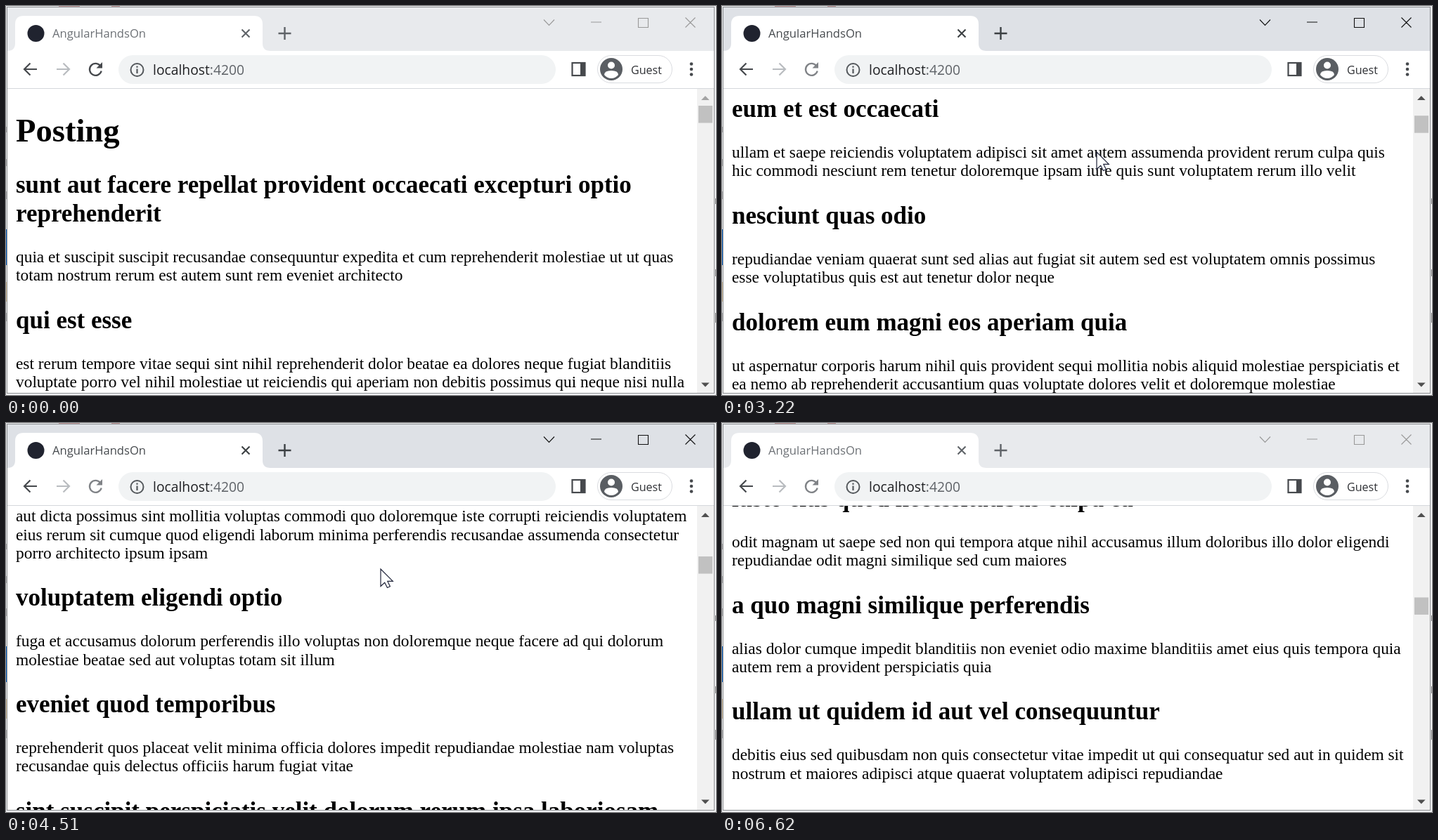
These frames come from a looping animation (1010x554 px, 6730 ms). An HTML page:

```html
<!DOCTYPE html>
<html lang="en">
<head>
<meta charset="utf-8">
<title>Posting</title>
<style>
html, body { margin: 0; width: 100%; height: 100%; overflow: hidden; background: #f4f5f7; }
svg { position: absolute; left: 0; top: 0; }
svg text { font-family: "Open Sans", "Noto Sans", sans-serif; }
#view { position: absolute; left: 2px; top: 118px; width: 981px; height: 433px; overflow: hidden; background: #fff; }
#doc { display: flow-root; margin-left: 12px; width: 957.5px; color: #000; font: 23.38px/26.3px "Liberation Serif", "Times New Roman", serif; }
h1 { font-size: 46.6px; line-height: 53.6px; margin: 32.5px 0 31.1px; }
h2 { font-size: 35px; line-height: 40.9px; margin: 31.1px 0 27.1px; }
p { margin: 0; }
</style>
</head>
<body>
<svg id="frame" width="1010" height="554" viewBox="0 0 1010 554" fill="none">
  <rect width="1010" height="554" fill="#f1f2f4"/>
  <path d="M0 318h2v51h-2z" fill="#0b63c4"/>
  <path d="M0 393h2v28h-2z" fill="#d8c3a0"/>
  <path d="M0 172v8M0 218v10M0 264v11M0 437v12M1009.500 274v8M1009.500 375v10M1009.500 437v14" stroke="#777"/>
  <path d="M75 .5h30M150 .5h12" stroke="#c9a0a0"/>
  <rect x="1.500" y="1.500" width="1006" height="550" fill="#fff" stroke="#8a8c8f"/>
  <rect id="strip" x="2" y="2" width="1005" height="62"/>
  <path d="M2 64Q13 64 13 53V26Q13 14 25 14H353Q365 14 365 26V53Q365 64 376 64Z" fill="#fff"/>
  <circle id="icon" cx="42.500" cy="39" r="12" fill="#20232f"/>
  <path id="spin" stroke="#c4c8cd" stroke-width="2"/>
  <text id="tab" x="66" y="45" font-size="16.600">AngularHandsOn</text>
  <g id="marks" stroke-width="2.100">
    <path d="M335.500 33.500l11 11m0-11l-11 11"/>
    <path d="M387.500 39h18m-9-9v18" stroke-width="2.400"/>
  </g>
  <path id="controls" d="M765 19.500l7.500 8 7.500-8M832 23h15M899.500 17.500h14v13h-14zM966.500 16.500l14 14m0-14l-14 14" stroke-width="1.100"/>
  <path d="M44 90H26m8.500-8.500L26 90l8.500 8.500" stroke="#46494d" stroke-width="2.200"/>
  <path d="M72 90h18m-8.500-8.500L90 90l-8.500 8.500" stroke="#b9bcc0" stroke-width="2.200"/>
  <g id="reload">
    <path d="M134.500 85.500A8.500 8.500 0 1 0 135.700 92.500" stroke-width="2.300"/>
    <path d="M137 80v8.500h-8.500z" stroke="none"/>
  </g>
  <path id="stop" d="M119.500 82.500l15.500 15.500m0-15.500l-15.500 15.500" stroke="#46494d" stroke-width="2.300"/>
  <rect x="160" y="70" width="622" height="41" rx="20.500" fill="#f1f3f4"/>
  <circle cx="186.500" cy="91" r="9" stroke="#54585c" stroke-width="2"/>
  <path d="M186.500 89.500v6.500M186.500 85.500v2.300" stroke="#54585c" stroke-width="2.200"/>
  <text x="209" y="98" font-size="19.300" fill="#202124">localhost<tspan fill="#5f6368">:4200</tspan></text>
  <g id="share" stroke="#5f6368" stroke-width="2.200">
    <path d="M746 87v-3q0-3 3-3h3M760 81h3q3 0 3 3v3M766 95v3q0 3-3 3h-3M752 101h-3q-3 0-3-3v-3"/>
    <path d="M751.500 86.500h3v3h-3zM757.500 86.500h3v3h-3zM751.500 92.500h3v3h-3zM757.500 92.500h3v3h-3z"/>
  </g>
  <rect x="805.500" y="81" width="18" height="18" stroke="#46494d" stroke-width="2.200"/>
  <path d="M817 81h7v18h-7z" fill="#46494d"/>
  <rect x="841.500" y="70.500" width="106" height="39" rx="19.500" fill="#fff" stroke="#dadce0"/>
  <circle cx="861" cy="90" r="16" fill="#5a5e63"/>
  <circle cx="861" cy="84.500" r="5" fill="#fff"/>
  <path d="M851 98q0-6 10-6t10 6q-4 5-10 5t-10-5z" fill="#fff"/>
  <text x="889" y="96.500" font-size="16.100" fill="#303236">Guest</text>
  <g fill="#46494d"><circle cx="975" cy="82.500" r="2.300"/><circle cx="975" cy="90" r="2.300"/><circle cx="975" cy="97.500" r="2.300"/></g>
  <path d="M2 117.500h1005" stroke="#d5d8dc"/>
  <g id="bar">
    <rect x="983" y="118" width="24" height="433" fill="#f1f1f1"/>
    <path id="up" d="M989 134l5.800-6 5.800 6z"/>
    <path d="M989 536.500l5.800 6 5.800-6z" fill="#505050"/>
    <rect id="thumb" x="985" width="20" height="24.500" fill="#c1c1c1"/>
  </g>
</svg>
<div id="view"><div id="doc"><h1>Posting</h1><div id="list"></div></div></div>
<svg width="1010" height="554" viewBox="0 0 1010 554">
  <path id="arrow" d="M0 0V24.500l5.700-5.300 3.700 7.300 4-1.800-3.600-7.300H17.300z" fill="#fff" stroke="#20243a" stroke-width="1.200"/>
  <path id="beam" d="M-6-11h4.500L0-9.500 1.500-11H6M0-10V10M-6 11h4.500L0 9.500 1.500 11H6" fill="none" stroke="#111" stroke-width="2"/>
</svg>
<script>
const posts = `sunt aut facere repellat provident occaecati excepturi optio reprehenderit|quia et suscipit suscipit recusandae consequuntur expedita et cum reprehenderit molestiae ut ut quas totam nostrum rerum est autem sunt rem eveniet architecto
qui est esse|est rerum tempore vitae sequi sint nihil reprehenderit dolor beatae ea dolores neque fugiat blanditiis voluptate porro vel nihil molestiae ut reiciendis qui aperiam non debitis possimus qui neque nisi nulla
ea molestias quasi exercitationem repellat qui ipsa sit aut|et iusto sed quo iure voluptatem occaecati omnis eligendi aut ad voluptatem doloribus vel accusantium quis pariatur molestiae porro eius odio et labore et velit aut
eum et est occaecati|ullam et saepe reiciendis voluptatem adipisci sit amet autem assumenda provident rerum culpa quis hic commodi nesciunt rem tenetur doloremque ipsam iure quis sunt voluptatem rerum illo velit
nesciunt quas odio|repudiandae veniam quaerat sunt sed alias aut fugiat sit autem sed est voluptatem omnis possimus esse voluptatibus quis est aut tenetur dolor neque
dolorem eum magni eos aperiam quia|ut aspernatur corporis harum nihil quis provident sequi mollitia nobis aliquid molestiae perspiciatis et ea nemo ab reprehenderit accusantium quas voluptate dolores velit et doloremque molestiae
magnam facilis autem|dolore placeat quibusdam ea quo vitae magni quis enim qui quis quo nemo aut saepe quidem repellat excepturi ut quia sunt ut sequi eos ea sed quas
dolorem dolore est ipsam|dignissimos aperiam dolorem qui eum facilis quibusdam animi sint suscipit qui sint possimus cum quaerat magni maiores excepturi ipsam ut commodi dolor voluptatum modi aut vitae
nesciunt iure omnis dolorem tempora et accusantium|consectetur animi nesciunt iure dolore enim quia ad veniam autem ut quam aut nobis et est aut quod aut provident voluptas autem voluptas
optio molestias id quia eum|quo et expedita modi cum officia vel magni doloribus qui repudiandae vero nisi sit quos veniam quod sed accusamus veritatis error
et ea vero quia laudantium autem|delectus reiciendis molestiae occaecati non minima eveniet qui voluptatibus accusamus in eum beatae sit vel qui neque voluptates ut commodi qui incidunt ut animi commodi
in quibusdam tempore odit est dolorem|itaque id aut magnam praesentium quia et ea odit et ea voluptas et sapiente quia nihil amet occaecati quia id voluptatem incidunt ea est distinctio odio
dolorum ut in voluptas mollitia et saepe quo animi|aut dicta possimus sint mollitia voluptas commodi quo doloremque iste corrupti reiciendis voluptatem eius rerum sit cumque quod eligendi laborum minima perferendis recusandae assumenda consectetur porro architecto ipsum ipsam
voluptatem eligendi optio|fuga et accusamus dolorum perferendis illo voluptas non doloremque neque facere ad qui dolorum molestiae beatae sed aut voluptas totam sit illum
eveniet quod temporibus|reprehenderit quos placeat velit minima officia dolores impedit repudiandae molestiae nam voluptas recusandae quis delectus officiis harum fugiat vitae
sint suscipit perspiciatis velit dolorum rerum ipsa laboriosam odio|suscipit nam nisi quo aperiam aut asperiores eos fugit maiores voluptatibus quia voluptatem quis ullam qui in alias quia est consequatur magni mollitia accusamus ea nisi voluptate dicta
fugit voluptas sed molestias voluptatem provident|eos voluptas et aut odit natus earum aspernatur fuga molestiae ullam deserunt ratione qui eos qui nihil ratione nemo velit ut aut id quo
voluptate et itaque vero tempora molestiae|eveniet quo quis laborum totam consequatur non dolor ut et est repudiandae est voluptatem vel debitis et magnam
adipisci placeat illum aut reiciendis qui|illum quis cupiditate provident sit magnam ea sed aut omnis veniam maiores ullam consequatur atque adipisci quo iste expedita sit quos voluptas
doloribus ad provident suscipit at|qui consequuntur ducimus possimus quisquam amet similique suscipit porro ipsam amet eos veritatis officiis exercitationem vel fugit aut necessitatibus totam omnis rerum consequatur expedita quidem cumque explicabo
asperiores ea ipsam voluptatibus modi minima quia sint|repellat aliquid praesentium dolorem quo sed totam minus non itaque nihil labore molestiae sunt dolor eveniet hic recusandae veniam tempora et tenetur expedita sunt
dolor sint quo a velit explicabo quia nam|eos qui et ipsum ipsam suscipit aut sed omnis non odio expedita earum mollitia molestiae aut atque rem suscipit nam impedit esse
maxime id vitae nihil numquam|veritatis unde neque eligendi quae quod architecto quo neque vitae est illo sit tempora doloremque fugit quod et et vel beatae sequi ullam sed tenetur perspiciatis
autem hic labore sunt dolores incidunt|enim et ex nulla omnis voluptas quia qui voluptatem consequatur numquam aliquam sunt totam recusandae id dignissimos aut sed asperiores deserunt
rem alias distinctio quo quis|ullam consequatur ut omnis quis sit vel consequuntur ipsa eligendi ipsum molestiae et omnis error nostrum molestiae illo tempore quia et distinctio
est et quae odit qui non|similique esse doloribus nihil accusamus omnis dolorem fuga consequuntur reprehenderit fugit recusandae temporibus perspiciatis cum ut laudantium omnis aut molestiae vel vero
quasi id et eos tenetur aut quo autem|eum sed dolores ipsam sint possimus debitis occaecati debitis qui qui et ut placeat enim earum aut odit facilis consequatur suscipit necessitatibus rerum sed inventore temporibus consequatur
delectus ullam et corporis nulla voluptas sequi|non et quaerat ex quae ad maiores maiores recusandae totam aut blanditiis mollitia quas illo ut voluptatibus voluptatem similique nostrum eum
iusto eius quod necessitatibus culpa ea|odit magnam ut saepe sed non qui tempora atque nihil accusamus illum doloribus illo dolor eligendi repudiandae odit magni similique sed cum maiores
a quo magni similique perferendis|alias dolor cumque impedit blanditiis non eveniet odio maxime blanditiis amet eius quis tempora quia autem rem a provident perspiciatis quia
ullam ut quidem id aut vel consequuntur|debitis eius sed quibusdam non quis consectetur vitae impedit ut qui consequatur sed aut in quidem sit nostrum et maiores adipisci atque quaerat voluptatem adipisci repudiandae`;

const LOOP = 6730, NOTCH = 146.1;
const $ = id => document.getElementById(id);
const set = (id, attrs) => { for (const k in attrs) $(id).setAttribute(k, attrs[k]); };
const show = (id, on) => { $(id).style.visibility = on ? "visible" : "hidden"; };

// Every body is two lines tall, except two longer ones
$("list").innerHTML = posts.split("\n").map((post, i) => {
  const [title, body] = post.split("|");
  const lines = i === 12 || i === 19 ? 3 : 2;
  return `<h2>${title}</h2><p style="height:${lines * 26.3}px">${body}</p>`;
}).join("");

// Wheel bursts: first step, last step, step count, notches before and after
const bursts = [
  [2350, 2990, 13, 0, 4], [3220, 3220, 1, 4, 4.136], [3270, 3490, 5, 4.136, 9],
  [3650, 3920, 6, 9, 10.73], [3970, 4290, 7, 10.73, 13], [4390, 4510, 3, 13, 14],
  [4720, 4920, 5, 14, 20], [5180, 5350, 4, 20, 26], [5610, 5920, 7, 26, 31]
];

function stepped(t, from, to, count) {
  if (t < from) return 0;
  if (t >= to) return 1;
  return (Math.floor((t - from) / (to - from) * (count - 1)) + 1) / count;
}
const ease = p => p < 0.5 ? 4 * p ** 3 : 1 - 4 * (1 - p) ** 3;
const smooth = p => p * p * (3 - 2 * p);
const mix = (a, b, p) => a + (b - a) * p;

function scrollAt(t) {
  let notches = 0;
  for (const [from, to, count, a, b] of bursts)
    if (t >= from) notches = mix(a, b, ease(stepped(t, from, to, count)));
  return Math.round(notches * NOTCH);
}

function pointerAt(t) {
  if (t < 1540) {
    const p = smooth(stepped(t, 50, 650, 12));
    const nudge = t < 860 ? 1 : t < 1030 ? 0.5 : 0;
    return [mix(614, 606, p) + nudge, mix(-28, 105, p)];
  }
  if (t < 5950) {
    const p = smooth(stepped(t, 1590, 2130, 11));
    return [mix(606, 533, p), mix(105, 208, p)];
  }
  if (t >= 6350) return [610, -40];
  const p = smooth(stepped(t, 5950, 6300, 7));
  return [mix(533, 606, p), mix(208, -2, p)];
}

function arc(cx, cy, r, a, b) {
  const at = v => `${cx + r * Math.cos(v)} ${cy + r * Math.sin(v)}`;
  return `M${at(a)}A${r} ${r} 0 ${b - a > Math.PI ? 1 : 0} 1 ${at(b)}`;
}

function draw(t) {
  const active = t >= 600 && t < 6560;
  const loading = t >= 1540 && t < 1870;
  const scroll = scrollAt(t);

  set("strip", { fill: active ? "#dee1e6" : "#e8eaed" });
  set("tab", { fill: active ? "#45494d" : "#6c7075" });
  set("marks", { stroke: active ? "#3c4043" : "#5f6368" });
  set("controls", { stroke: active ? "#111" : "#999" });

  const tone = t < 1540 ? "#46494d" : "#808387";
  set("reload", { stroke: tone, fill: "none" });
  $("reload").lastElementChild.setAttribute("fill", tone);
  show("reload", !loading);
  show("stop", loading);
  show("icon", !loading);
  show("spin", loading);
  if (loading) {
    const age = (t - 1540) / 330, start = -Math.PI / 2 - age * 3;
    set("spin", { d: arc(42, 39, 9.5, start - 0.2 - age * 1.5, start) });
  }
  show("share", t >= 650 && t < 1650);

  const listed = t < 1650 || t >= 1870;
  show("doc", t < 1650 || t >= 1760);
  $("list").style.display = listed ? "" : "none";
  show("bar", listed);
  $("doc").style.transform = `translateY(${-scroll}px)`;
  set("up", { fill: scroll ? "#505050" : "#a3a3a3" });
  set("thumb", { y: 142 + scroll * 0.0235 });

  const [x, y] = pointerAt(t);
  const typing = y > 70 && y < 112 && x < 782;
  show("beam", typing);
  show("arrow", !typing && y > -27);
  set(typing ? "beam" : "arrow", { transform: `translate(${x} ${y})` });
}

const start = performance.now();
function tick() {
  draw((performance.now() - start) % LOOP);
  requestAnimationFrame(tick);
}
tick();
</script>
</body>
</html>
```
